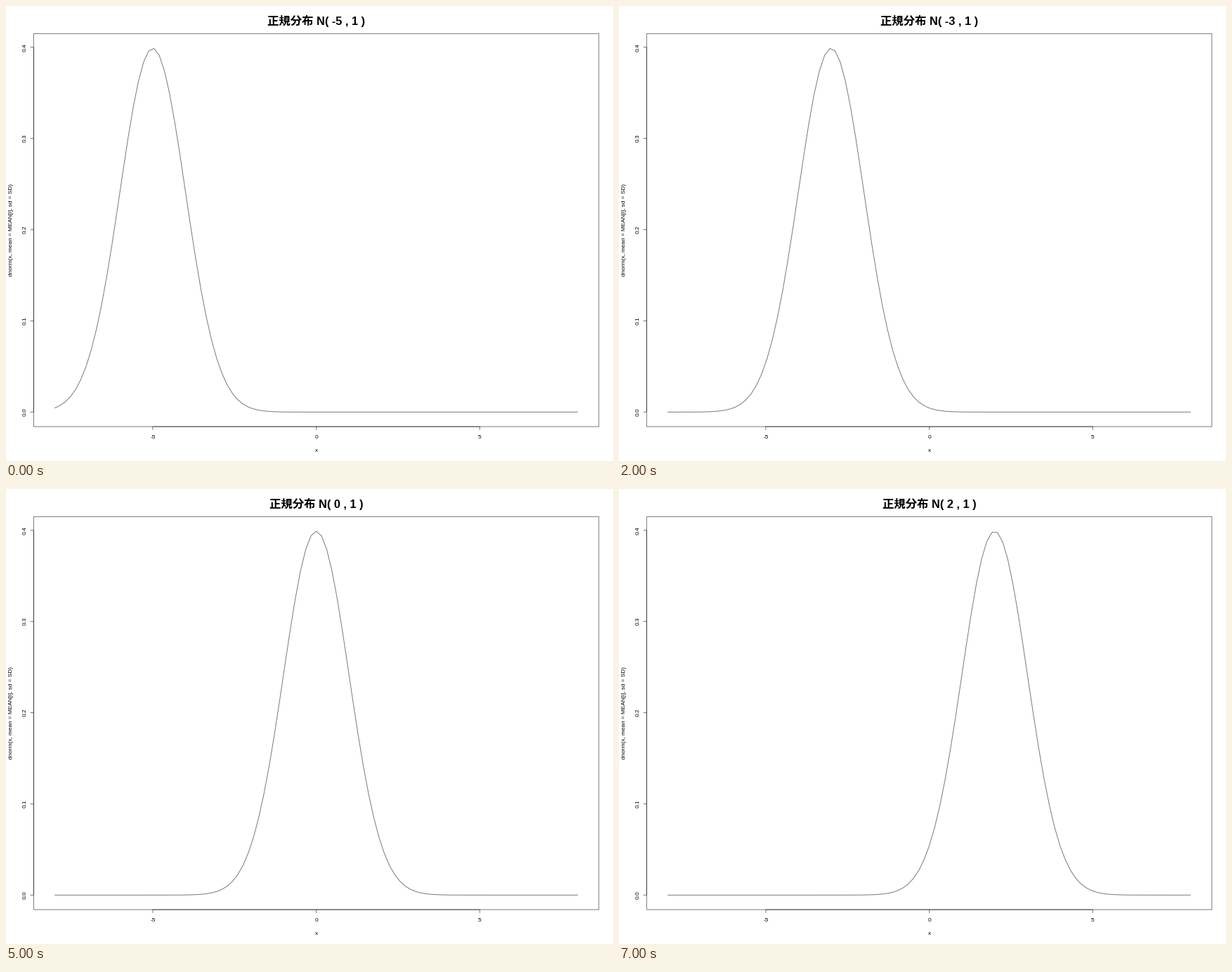
These frames come from a looping animation (864 by 648 pixels, 8 s). A matplotlib script:

```python
import numpy as np
import matplotlib.pyplot as plt
from matplotlib.animation import FuncAnimation

W, H = 864, 648
LINE = 9.6                      # height of one margin line in pixels
FONT = 8.2
LEFT, RIGHT = 4.1 * LINE, W - 2.1 * LINE
TOP, BOTTOM = 4.1 * LINE, H - 5.1 * LINE
X_MIN, X_MAX = -8, 8
SD = 1
MEANS = range(-5, 3)
PAD = 0.04                      # blank share on each side of the data range

plt.rcParams["font.family"] = ["Liberation Sans", "Noto Sans CJK JP"]
plt.rcParams["path.simplify"] = False


def dnorm(x, mean):
    return np.exp(-((x - mean) / SD) ** 2 / 2) / (SD * np.sqrt(2 * np.pi))


def scale(value, low, high, start, end):
    share = (np.asarray(value) - low) / (high - low)
    return start + (end - start) * (PAD + share) / (1 + 2 * PAD)


def px(x):
    return scale(x, X_MIN, X_MAX, LEFT, RIGHT)


def py(y):
    return scale(y, 0, dnorm(0, 0), BOTTOM, TOP)


fig = plt.figure(figsize=(W / 72, H / 72), dpi=72, facecolor="white")
ax = fig.add_axes([0, 0, 1, 1])
ax.set_xlim(0, W)
ax.set_ylim(H, 0)
ax.axis("off")


def stroke(xs, ys):
    # Half-strength pixel-wide line: a soft hairline that darkens on overlap
    return ax.plot(xs, ys, color="black", lw=1, alpha=0.52, snap=False,
                   solid_capstyle="butt", solid_joinstyle="round")[0]


def label(x, y, text, size=FONT, **kw):
    return ax.text(x, y, text, fontsize=size, color="black", ha="center",
                   va="baseline", rotation_mode="anchor", **kw)


# Frame around the plot
stroke([LEFT, RIGHT, RIGHT, LEFT, LEFT], [BOTTOM, BOTTOM, TOP, TOP, BOTTOM])

# Horizontal axis
stroke(px([-5, 5]), [BOTTOM, BOTTOM])
for tick in (-5, 0, 5):
    stroke([px(tick)] * 2, [BOTTOM, BOTTOM + LINE / 2])
    label(px(tick), 616, str(tick))

# Vertical axis
stroke([LEFT, LEFT], py([0, 0.4]))
for tick in np.arange(5) / 10:
    stroke([LEFT, LEFT - LINE / 2], [py(tick)] * 2)
    label(29, py(tick), f"{tick:.1f}", rotation=90)

mid_x, mid_y = (LEFT + RIGHT) / 2, (TOP + BOTTOM) / 2
label(mid_x, 635, "x")
label(9, mid_y, "dnorm(x, mean = MEAN[i], sd = SD)", rotation=90)
title = label(mid_x, 27, "", size=2 * FONT, weight="bold")

grid = np.linspace(X_MIN, X_MAX, 101)
curve = stroke(px(grid), py(0 * grid))


def draw(i):
    mean = MEANS[i]
    curve.set_ydata(py(dnorm(grid, mean)))
    title.set_text(f"正規分布 N( {mean} , {SD} )")
    return curve, title


anim = FuncAnimation(fig, draw, frames=len(MEANS), interval=1000,
                     repeat=True, repeat_delay=0)
plt.show()
```
